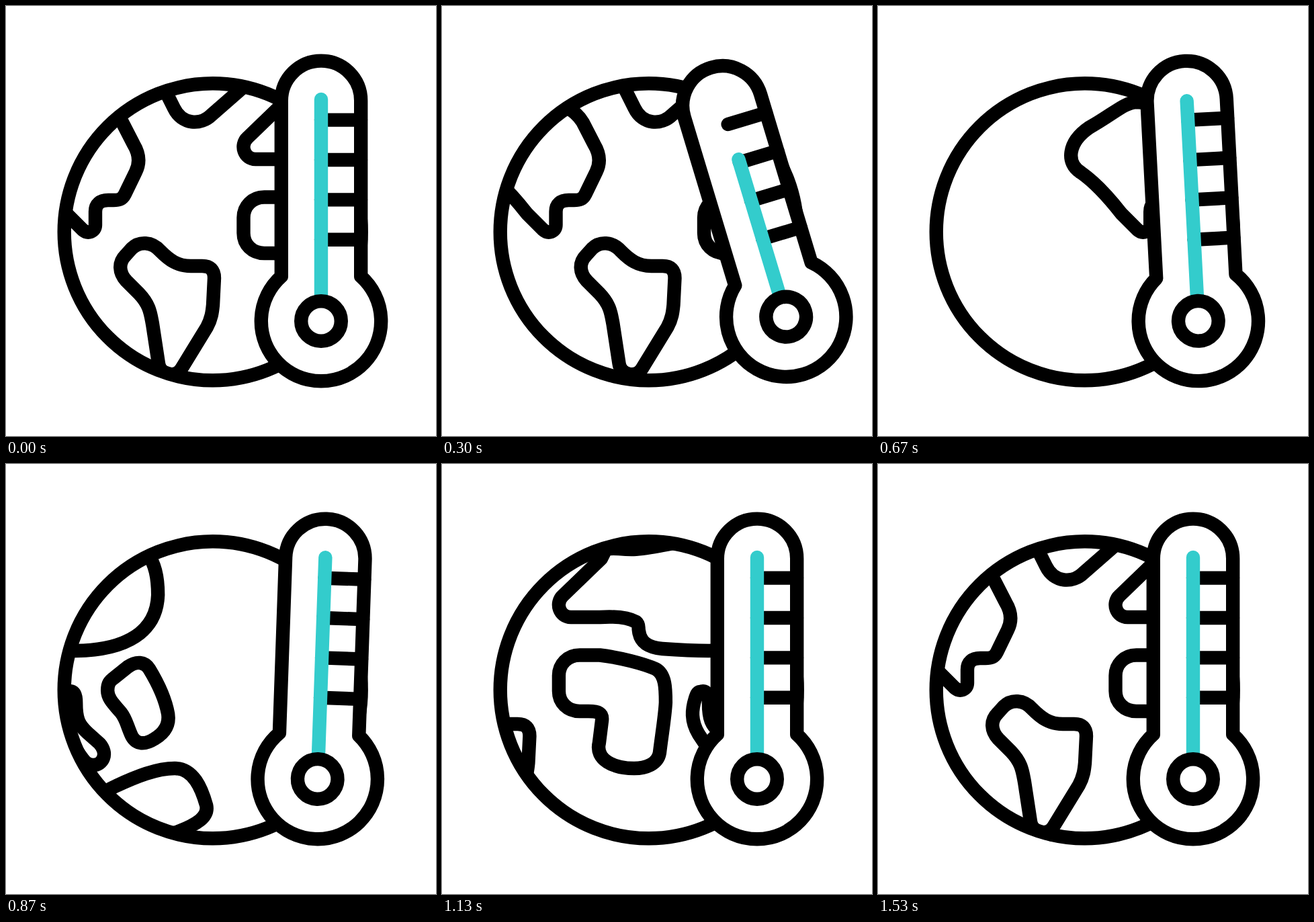
An HTML page that plays this animation: 640 by 640 pixels, repeating every 1670 ms.

```html
<!DOCTYPE html>
<html lang="en">
<head>
<meta charset="utf-8">
<title>Globe and thermometer</title>
<style>
  html, body { margin: 0; height: 100%; overflow: hidden; background: #fff; }
  svg { display: block; width: 100vw; height: 100vh; }
</style>
</head>
<body>
<svg viewBox="0 0 640 640" fill="none" stroke="#000" stroke-width="20.4" stroke-linecap="round" stroke-linejoin="round">
  <defs>
    <clipPath id="disc"><circle cx="307.7" cy="336.3" r="230"/></clipPath>
    <g id="land">
      <!-- Americas -->
      <path d="M230 112L250 152C262 177 290 178 306 162L362 113"/>
      <path d="M133 306V326C133 336 122 340 114 333L90 309C68 281 50 262 30 248C7 234 10 203 42 181C78 161 95 143 113 143C140 144 160 152 173 173L190 206C199 221 199 235 193 247L177 280C173 288 168 289 160 289H152C140 289 133 295 133 306Z"/>
      <path d="M310 405C310 393 304 387 292 387H275C255 387 243 378 230 365C217 350 198 350 187 361L178 371C167 382 168 397 179 409L198 428C214 445 215 457 218 473L227 532C229 549 252 554 261 540L299 478C306 465 307 455 308 445Z"/>
      <!-- Africa, Eurasia, islands -->
      <g transform="translate(179.5)">
        <path d="M205 284.5H235C265 288 300 297 318 305C333 313 333 335 333 355C332 375 327 405 324 430C321 447 303 453 286 453C255 453 228 440 234 415L238 383C240 370 232 368 218 368H205C187 368 174 355 174 338V315C174 298 187 284.5 205 284.5Z"/>
        <path d="M192 228H235C265 226 280 230 289 235C294 239 292 243 293 248C295 265 306 273 328 275C355 277 375 278 397 278C472 277 517 250 519 195C519 175 516 150 504 135C496 118 480 112 460 112L345 118C315 123 300 127 282 127C262 127 255 124 244 127L237 141L180 196C168 207 175 228 192 228Z"/>
        <path d="M384 339C395 335 397 345 397 355C397 380 401 388 414 400L432 416C446 432 436 448 423 448C413 448 409 442 402 432L382 402C370 382 372 365 377 349C379 343 380 340 384 339Z"/>
      </g>
      <!-- Oceania -->
      <g transform="translate(471.5)">
        <path d="M162 318L182 302C195 293 207 294 214 305C228 328 238 350 242 372C245 392 232 403 222 409C208 418 195 418 188 405C181 390 180 380 172 370C163 359 152 350 152 337C152 327 155 323 162 318Z"/>
        <path d="M165 479C195 465 225 453 252 453C280 453 292 483 299 508C303 526 283 537 255 548C235 555 170 545 150 535C120 520 125 497 165 479Z"/>
      </g>
    </g>
  </defs>

  <g clip-path="url(#disc)">
    <g id="strip">
      <use href="#land"/>
      <use href="#land" x="-963"/>
    </g>
  </g>
  <circle cx="307.7" cy="336.3" r="221"/>

  <g id="thermometer">
    <path fill="#fff" d="M409.8 402.4V140.8A59.2 59.2 0 0 1 528.2 140.8V402.4A89.2 89.2 0 1 1 409.8 402.4Z"/>
    <path d="M469 169.6H528M469 229H528M469 288.4H528M469 347.8H528"/>
    <path id="level" stroke="#3cc"/>
    <circle cx="469" cy="469" r="29.8" fill="#fff"/>
  </g>
</svg>
<script>
const LOOP = 1670, STRIP_WIDTH = 963;
const [strip, thermometer, level] = ['strip', 'thermometer', 'level'].map(id => document.getElementById(id));

// Cubic Bézier easing with handles (x1, 0) and (x2, 1)
function ease(p, x1 = 0.42, x2 = 0.58) {
  let low = 0, high = 1;
  for (let i = 0; i < 24; i++) {
    const u = (low + high) / 2, v = 1 - u;
    if (3 * v * v * u * x1 + 3 * v * u * u * x2 + u * u * u < p) low = u;
    else high = u;
  }
  return low * low * (3 - 2 * low);
}

// Eased value of a track of [tick, value] keys
function track(keys, tick, ...handles) {
  if (tick <= keys[0][0]) return keys[0][1];
  const next = keys.findIndex(key => key[0] > tick);
  if (next < 0) return keys[keys.length - 1][1];
  const [t0, a] = keys[next - 1], [t1, b] = keys[next];
  return a + (b - a) * ease((tick - t0) / (t1 - t0), ...handles);
}

const scroll = [[2, 0], [46, STRIP_WIDTH]];
const swing = [[2, 0], [9, -16.8], [15.2, 8.2], [21.2, -4], [27, 2.4], [33, 0]];
const drop = [[2.5, 0], [13, 122], [20.7, 0]];

function draw() {
  // 30 steps per second
  const tick = Math.floor(performance.now() % LOOP * 0.03 + 0.15);
  strip.setAttribute('transform', `translate(${track(scroll, tick, 0.494, 0.613)})`);
  thermometer.setAttribute('transform', `rotate(${track(swing, tick)} 469 319.5)`);
  level.setAttribute('d', `M469 ${139 + track(drop, tick)}V445`);
  requestAnimationFrame(draw);
}
draw();
</script>
</body>
</html>
```
